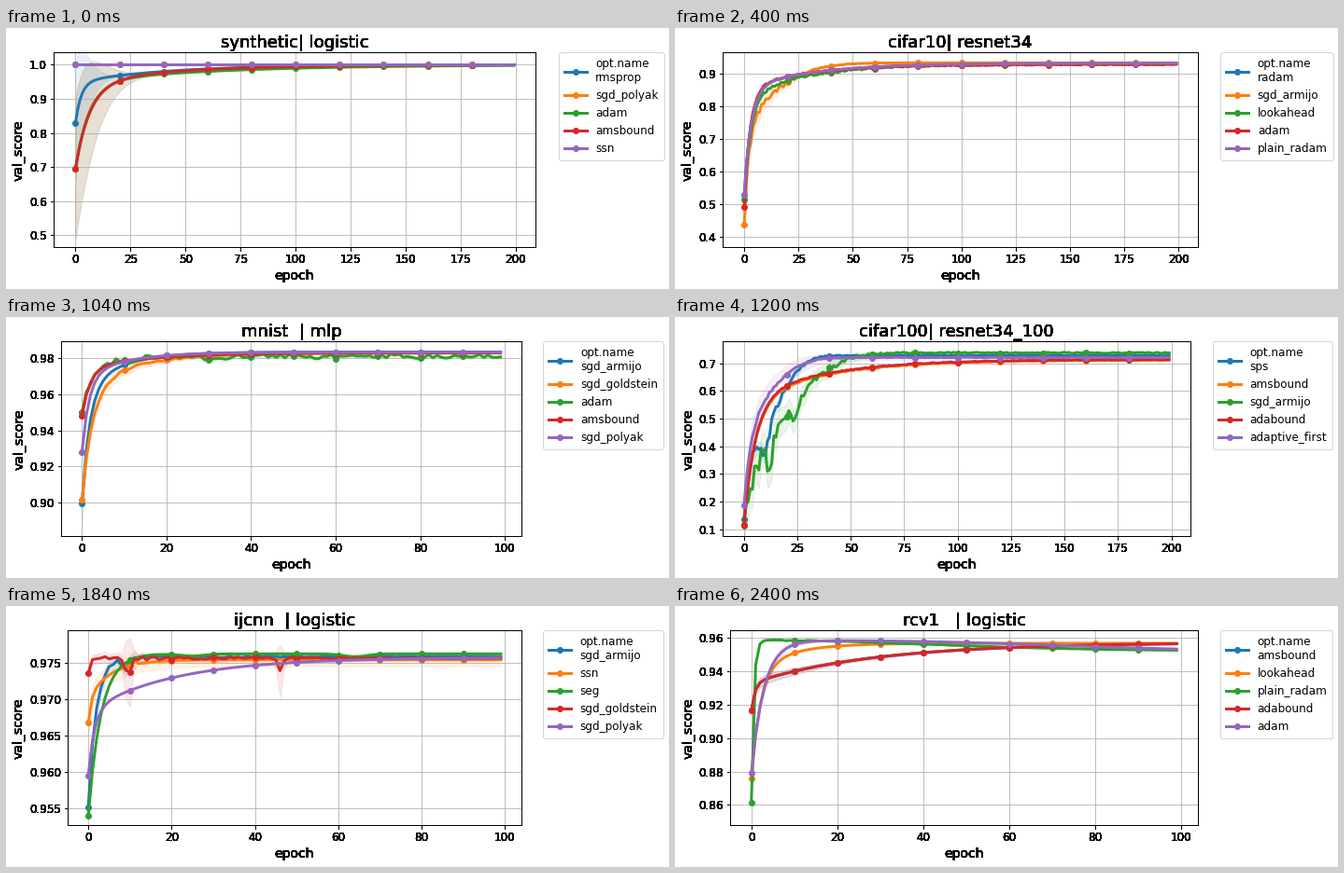
Recreate the animation shown at these times as a matplotlib script. Size 710 by 280 pixels, loop 2.8 s.

```python
import numpy as np
import matplotlib.pyplot as plt
from matplotlib.animation import FuncAnimation

W, H, DPI = 710, 280, 72
TOP, BOTTOM = 26.4, 235.4
COLORS = ["#1f77b4", "#ff7f0e", "#2ca02c", "#d62728", "#9467bd"]
LAYERS = 12  # stacked copies of the frame text give it its heavy look

slides = []


def fade(e, amp, tau, floor=0.0):
    """Amplitude that falls from amp to floor over about tau epochs."""
    return floor + (amp - floor) * np.exp(-(e / tau) ** 1.5)


def rise(e, start, end, fast, weight, slow, power):
    """Learning curve: a fast and a slow decay of the gap to the end value."""
    gap = (1 - weight) * np.exp(-e / fast) + weight * np.exp(-(e / slow) ** power)
    return end - (end - start) * gap


class Slide:
    def __init__(self, title, n, left, right, ylim, ticks, digits, note=""):
        self.title, self.n, self.left, self.right = title, n, left, right
        self.ylim, self.digits, self.note = ylim, digits, note
        first, last, step = ticks
        self.yticks = [k * step for k in range(first, last + 1)]
        self.epochs = np.arange(n)
        self.curves = []
        self.rng = np.random.default_rng(len(slides) + 3)
        slides.append(self)

    def curve(self, name, start, end, fast=1.0, weight=0.0, slow=1.0, power=1.0,
              noise=None, dips=(), spread=None, flare=0):
        e = self.epochs
        y = rise(e, start, end, fast, weight, slow, power)
        dip = sum((depth * np.exp(-((e - mid) / width) ** 2)
                   for mid, depth, width in dips), np.zeros(self.n))
        y = y - dip
        if noise:
            jitter = self.rng.uniform(-1, 1, self.n)
            jitter[0] = 0
            y = y + fade(e, *noise) * jitter
        band = fade(e, *spread) + flare * dip if spread else None
        self.curves.append((name, y, band))

    def decorate(self, ax):
        last = self.n - 1
        ax.set_xlim(-0.05 * last, 1.05 * last)
        ax.set_ylim(*self.ylim)
        ax.set_xticks(range(0, 201, 25) if self.n == 200 else range(0, 101, 20))
        labels = [f"{t:.{self.digits}f}".replace("-", "\u2212") for t in self.yticks]
        ax.set_yticks(self.yticks, labels)
        ax.tick_params(labelsize=12)
        ax.set_title(self.title, fontsize=18, pad=5.3)
        ax.set_xlabel("epoch", fontsize=14)
        ax.set_ylabel("val_score", fontsize=14)
        ax.annotate(self.note, (0, 1), (0, 3), xycoords="axes fraction",
                    textcoords="offset points", fontsize=10)

    def draw(self, fig):
        box = [self.left / W, 1 - BOTTOM / H,
               (self.right - self.left) / W, (BOTTOM - TOP) / H]
        ax = fig.add_axes(box)
        for i, (name, y, band) in enumerate(self.curves):
            label = name if i else "opt.name\n" + name
            ax.plot(self.epochs, y, color=COLORS[i], lw=3, marker="o",
                    markevery=self.n // 10, label=label)
            if band is not None:
                ax.fill_between(self.epochs, y - band, y + band,
                                color=COLORS[i], alpha=0.1)
        ax.grid(True)
        ax.legend(loc="upper left", bbox_to_anchor=(1.0475, 1),
                  borderaxespad=0, borderpad=0.5, fontsize=12)
        self.decorate(ax)
        for _ in range(LAYERS - 1):
            self.decorate(fig.add_axes(box, facecolor="none"))


s = Slide("synthetic| logistic", 200, 51, 567, (0.4645, 1.0355), (5, 10, 0.1), 1)
s.curve("rmsprop", 0.83, 1, 2.6, 0.3, 42, spread=(0.17, 7))
s.curve("sgd_polyak", 1, 1)
s.curve("adam", 0.696, 1, 6.3, 0.17, 62, spread=(0.207, 13))
s.curve("amsbound", 0.696, 1, 6.5, 0.19, 42, spread=(0.207, 13))
s.curve("ssn", 1, 1)

s = Slide("cifar10| resnet34", 200, 51, 560, (0.3687, 0.9642), (4, 9, 0.1), 1)
s.curve("radam", 0.53, 0.932, 3.15, 0.19, 32)
s.curve("sgd_armijo", 0.437, 0.933, 2.1, 0.33, 20, 1.5,
        noise=(0.013, 22), spread=(0.035, 18, 0.002))
s.curve("lookahead", 0.514, 0.929, 3, 0.25, 28, noise=(0.004, 90, 0.001))
s.curve("adam", 0.493, 0.928, 2.7, 0.17, 30, noise=(0.003, 90, 0.001))
s.curve("plain_radam", 0.53, 0.932, 3.15, 0.19, 32)

s = Slide("mnist  | mlp", 100, 59, 552, (0.8811, 0.9893), (45, 49, 0.02), 2)
s.curve("sgd_armijo", 0.8995, 0.9835, 1.8, 0.25, 9, spread=(0.0135, 2))
s.curve("sgd_goldstein", 0.9015, 0.983, 2.4, 0.25, 12,
        noise=(0.0008, 25), spread=(0.004, 20))
s.curve("adam", 0.95, 0.9812, 2.3, 0.1, 15,
        noise=(0.0017, 80, 0.001), spread=(0.0015, 80, 0.001))
s.curve("amsbound", 0.948, 0.983, 1.85, 0.25, 15)
s.curve("sgd_polyak", 0.928, 0.9834, 1.65, 0.25, 10)

s = Slide("cifar100| resnet34_100", 200, 51, 552, (0.0747, 0.7785), (1, 7, 0.1), 1)
s.curve("sps", 0.135, 0.728, 2, 0.58, 19, 2.2, noise=(0.02, 20, 0.001),
        dips=[(10, 0.075, 2.5)], spread=(0.03, 22, 0.003))
s.curve("amsbound", 0.115, 0.712, 5.3, 0.26, 36, noise=(0.002, 200))
s.curve("sgd_armijo", 0.113, 0.738, 5, 0.55, 30, 2, noise=(0.035, 30, 0.002),
        dips=[(12, 0.1, 1.8), (24, 0.06, 2)], spread=(0.07, 35, 0.003))
s.curve("adabound", 0.115, 0.714, 5.3, 0.25, 36, noise=(0.002, 200))
s.curve("adaptive_first", 0.187, 0.721, 3.9, 0.3, 20, 2,
        noise=(0.007, 22, 0.001), spread=(0.06, 25, 0.008))

s = Slide("ijcnn  | logistic", 100, 66, 552, (0.9527, 0.9795), (191, 195, 0.005), 3)
s.curve("sgd_armijo", 0.9552, 0.9759, 1.9, noise=(0.0002, 60),
        dips=[(8.7, 0.0018, 0.9)], spread=(0.001, 12, 0.0003))
s.curve("ssn", 0.9668, 0.9755, 0.7, 0.6, 5.5,
        dips=[(11, -0.0008, 0.6)], spread=(0.0015, 15, 0.0009))
s.curve("seg", 0.954, 0.9763, 3.1, dips=[(25, 0.0003, 4), (64, 0.0004, 4)])
s.curve("sgd_goldstein", 0.9736, 0.9757, 0.5, noise=(0.0003, 55),
        dips=[(9.6, 0.0024, 1), (46, 0.0016, 0.8)],
        spread=(0.0007, 30, 0.0004), flare=2)
s.curve("sgd_polyak", 0.9596, 0.9758, 1.45, 0.45, 21)

s = Slide("mushrooms| logistic", 100, 84, 552, (-0.00057972, 0.0001578),
          (-5, 1, 0.0001), 4, "+1")
s.curve("sgd_armijo", -0.000245, 0, 0.05, spread=(0.0003, 0.2))
s.curve("sgd_goldstein", 0, 0)
s.curve("adaptive_first", 0, 0)
s.curve("lookahead", -0.000122, 0, 0.05, spread=(0.000246, 0.2))
s.curve("rmsprop", 0, 0)

s = Slide("rcv1   | logistic", 100, 59, 560, (0.8478, 0.96404), (43, 48, 0.02), 2)
s.curve("amsbound", 0.9165, 0.957, 0.83, 0.6, 29, spread=(0.003, 15, 0.0007))
s.curve("lookahead", 0.876, 0.9565, 2.1, 0.2, 9)
s.curve("plain_radam", 0.8615, 0.952, 0.53, -0.07, 58, 2, noise=(0.0002, 60))
s.curve("adabound", 0.9165, 0.957, 0.83, 0.6, 29, spread=(0.003, 15, 0.0007))
s.curve("adam", 0.879, 0.952, 2.9, -0.085, 82, 3, spread=(0.004, 10))

fig = plt.figure(figsize=(W / DPI, H / DPI), dpi=DPI, facecolor="white")


def update(i):
    fig.clear()
    slides[i].draw(fig)
    return []


anim = FuncAnimation(fig, update, frames=len(slides), interval=400,
                     init_func=lambda: update(0), repeat=True, repeat_delay=0)
plt.show()
```
